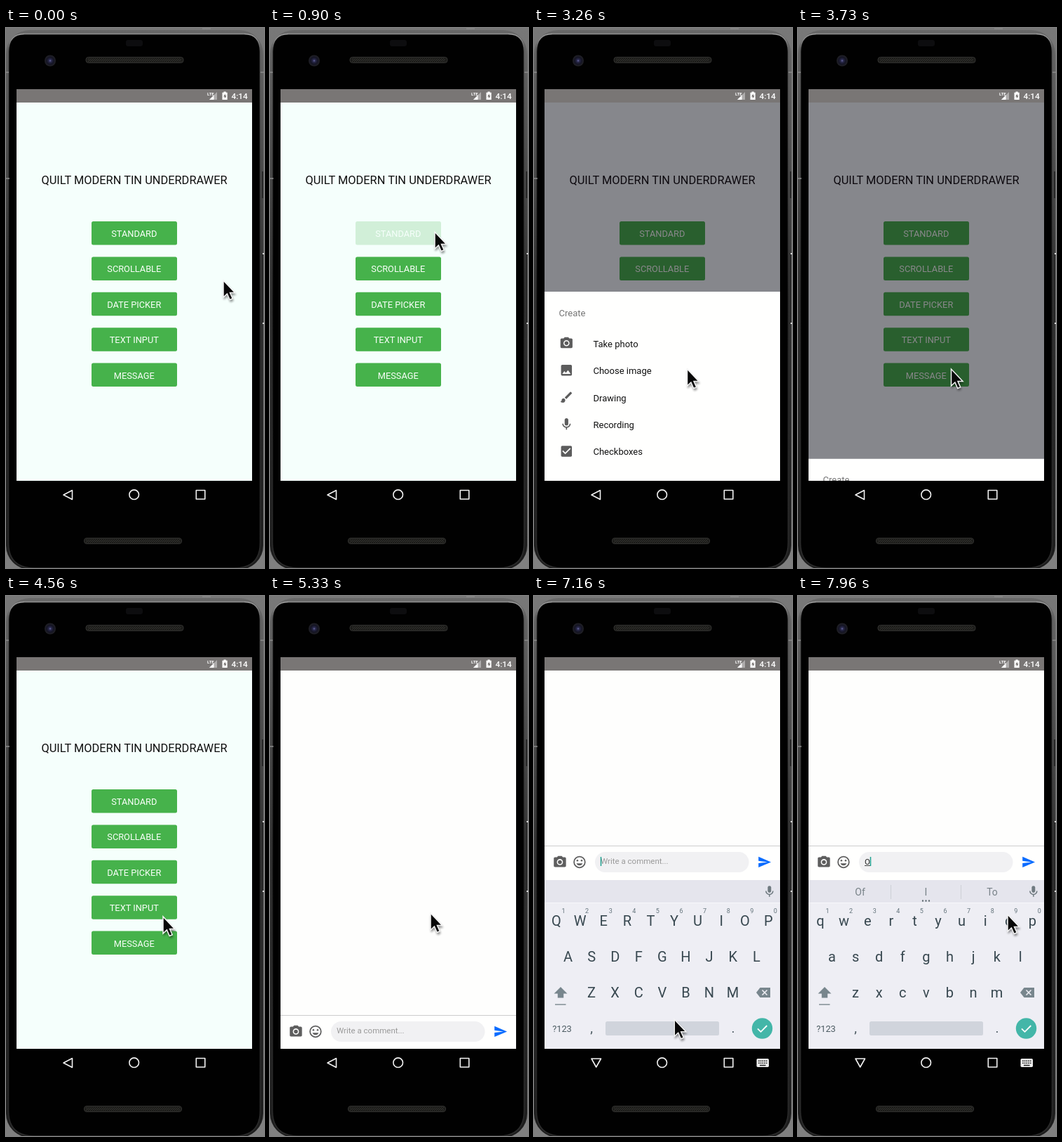
Animation of 368x768 px, one loop 8 s. Source, as an HTML page:

```html
<!DOCTYPE html>
<html lang="en">
<head>
<meta charset="utf-8">
<title>Bottom sheet demo</title>
<style>
  html, body { margin: 0; width: 100%; height: 100%; overflow: hidden; background: #666; }
  svg { display: block; width: 368px; height: 768px; font-family: Roboto, sans-serif; }
  .mid { text-anchor: middle; }
</style>
</head>
<body>
<svg viewBox="0 0 368 768">
  <defs>
    <linearGradient id="rim" x2="0" y2="1">
      <stop offset="0" stop-color="#686868"/><stop offset=".1" stop-color="#5c5c5c"/>
      <stop offset=".45" stop-color="#343434"/><stop offset="1" stop-color="#1c1c1c"/>
    </linearGradient>
    <linearGradient id="edge" x2="0" y2="1">
      <stop offset="0" stop-color="#a0a0a0"/><stop offset=".03" stop-color="#555"/>
      <stop offset=".5" stop-color="#222"/><stop offset="1" stop-color="#2c2c2c"/>
    </linearGradient>
    <linearGradient id="wall" x2="0" y2="1">
      <stop offset="0" stop-color="#787878"/><stop offset=".3" stop-color="#686868"/><stop offset="1" stop-color="#808080"/>
    </linearGradient>
    <radialGradient id="lens">
      <stop offset="0" stop-color="#7070a8"/><stop offset=".22" stop-color="#2c2c50"/>
      <stop offset=".6" stop-color="#141424"/><stop offset="1" stop-color="#222226"/>
    </radialGradient>
    <pattern id="mesh" width="3" height="3" patternUnits="userSpaceOnUse">
      <path d="M0 3L3 0" stroke="#3c3c39" stroke-width=".8"/>
    </pattern>
    <clipPath id="screen"><path d="M15 87h336v557H15z"/></clipPath>
    <filter id="soft" x="-50%" y="-50%" width="200%" height="200%"><feGaussianBlur stdDeviation="1.7"/></filter>

    <g id="camera"><path fill-rule="evenodd" d="M9 2L7.2 4H4c-1.1 0-2 .9-2 2v12c0 1.1.9 2 2 2h16c1.1 0 2-.9 2-2V6c0-1.1-.9-2-2-2h-3.2L15 2zM12 7a5 5 0 0 1 0 10 5 5 0 0 1 0-10z"/><circle cx="12" cy="12" r="3.2"/></g>
    <path id="image" d="M21 19V5c0-1.1-.9-2-2-2H5c-1.1 0-2 .9-2 2v14c0 1.1.9 2 2 2h14c1.1 0 2-.9 2-2zM8.5 13.5l2.5 3 3.5-4.5 4.5 6H5z"/>
    <path id="brush" d="M7 14c-1.7 0-3 1.3-3 3 0 1.3-1.2 2-2 2 .9 1.2 2.5 2 4 2 2.2 0 4-1.8 4-4 0-1.7-1.3-3-3-3zm13.7-9.4l-1.3-1.3c-.4-.4-1-.4-1.4 0l-9 9L11.8 15l8.9-9c.4-.4.4-1 0-1.4z"/>
    <g id="mic"><rect x="9" y="2" width="6" height="12" rx="3"/><path d="M5.9 11a6.1 6 0 0 0 12.2 0M12 17v4" fill="none" stroke="currentColor" stroke-width="1.9"/></g>
    <path id="check" d="M19 3H5c-1.1 0-2 .9-2 2v14c0 1.1.9 2 2 2h14c1.1 0 2-.9 2-2V5c0-1.1-.9-2-2-2zm-9 14l-5-5 1.4-1.4 3.6 3.6 7.6-7.6L19 8z"/>
    <g id="smile"><circle cx="12" cy="12" r="9" fill="none" stroke="currentColor" stroke-width="2"/><circle cx="8.5" cy="9.5" r="1.5"/><circle cx="15.5" cy="9.5" r="1.5"/><path d="M6.9 14h10.2a5.5 5.5 0 0 1-10.2 0z"/></g>
    <path id="send" d="M2 21l21-9L2 3v7l15 2-15 2z"/>
    <path id="arrow" d="M0 0V24L5.4 18.9 9.2 27.5 13.2 25.8 9.5 17.4H16.6Z"/>
  </defs>

  <!-- device -->
  <path d="M0 0h368v768H0z" fill="url(#wall)"/>
  <rect x="0" y="3" width="367" height="767" rx="34" fill="url(#rim)"/>
  <path d="M26 8.500H340Q362.500 8.500 362.500 34V732Q362.500 768 326 768H40Q3.500 768 3.500 732V34Q3.500 8.500 26 8.500Z" fill="#010101" stroke="url(#edge)" stroke-width="1.500"/>
  <path d="M26 8.500H340" stroke="#8c8c8c" stroke-width="1.200"/>
  <path d="M280 1h12M0 63h4M363 63h5M0 214h5" stroke="#8a8a8a" stroke-width="1.500"/>
  <path d="M366 204v38M366 321v99" stroke="#252525" stroke-width="2"/>
  <path d="M366 321h2M366 420h2" stroke="#ddd" stroke-width="2"/>
  <rect x="171" y="17" width="24" height="9" rx="3" fill="#0d0d0f"/>
  <circle cx="63" cy="46.500" r="8" fill="url(#lens)"/>
  <g fill="#1b1b19" stroke="#343432">
    <rect x="114" y="41.500" width="139" height="8" rx="3.500"/>
    <rect x="111.500" y="725.500" width="139" height="8" rx="3.500"/>
  </g>
  <path d="M117 43h133v5H117zM114 727h134v5H114z" fill="url(#mesh)"/>

  <!-- navigation bar -->
  <g fill="none" stroke="#f2f2f2" stroke-width="1.600" stroke-linejoin="round">
    <path id="back" d="M94.500 657.500V670.500L82 664Z"/>
    <path id="down" d="M82 658H95.500L88.700 670Z"/>
    <circle cx="182.700" cy="663.700" r="6.800"/>
    <rect x="271.300" y="657.500" width="12.500" height="12.500"/>
  </g>
  <g id="kbIcon">
    <rect x="317.500" y="658" width="17.500" height="12" rx="1.700" fill="#eee"/>
    <path d="M320 661.300h13M320 664.200h13" stroke="#222" stroke-width="1.600" stroke-dasharray="1.700 1"/>
    <path d="M322 667.500h8.500" stroke="#222" stroke-width="1.500"/>
  </g>

  <g clip-path="url(#screen)">
    <path d="M15 87h336v558H15z" fill="#f5fffc"/>
    <text class="mid" x="183" y="221.500" font-size="16.400" fill="#111">QUILT MODERN TIN UNDERDRAWER</text>
    <g id="buttons" class="mid" font-size="12.800"></g>
    <path id="shade" d="M15 106h336v539H15z" fill="rgba(10,0,14,.47)"/>

    <g id="sheet">
      <path d="M15 375h336v270H15z" fill="#fffffe"/>
      <text x="35.500" y="409.500" font-size="13" fill="#757575">Create</text>
      <g id="rows" font-size="13"></g>
    </g>

    <path id="page" d="M15 106h336v539H15z" fill="#fefefd"/>
    <g id="bar">
      <path d="M15 596h336v49H15z" fill="#fffffe"/>
      <path d="M15 596.500h336" stroke="#cdcdcd"/>
      <g fill="#5e5e5e" color="#5e5e5e">
        <use href="#camera" transform="translate(26.500 609) scale(.87)"/>
        <use href="#smile" transform="translate(54.500 609) scale(.87)"/>
      </g>
      <rect x="87" y="605" width="219.500" height="29" rx="14.500" fill="#f1f1f3"/>
      <text id="hint" x="95" y="622" font-size="11.500" fill="#9a9a9a">Write a comment...</text>
      <g id="typed"><text x="95" y="622.500" font-size="11.500" fill="#222">O</text><path d="M95 624.500h8" stroke="#444"/></g>
      <path id="caret" d="M0 612v13" stroke="#1fa08f" stroke-width="1.500"/>
      <use href="#send" fill="#0a6cff" transform="translate(318.500 609.200) scale(.85)"/>
    </g>

    <g id="keyboard">
      <path d="M15 404h336v241H15z" fill="#eeeef4"/>
      <path d="M15 404h336v32H15z" fill="#e5e5ed"/>
      <path d="M15 436.500h336" stroke="#f8f8fb"/>
      <g id="words">
        <g class="mid" font-size="14" fill="#788288">
          <text x="88.500" y="426">Of</text><text x="182.500" y="426">I</text><text x="277" y="426">To</text>
        </g>
        <path d="M132.500 411v20M232.500 411v20" stroke="#cdd0d6"/>
        <path d="M178 433.500h9.200" stroke="#5f6b70" stroke-width="2.400" stroke-linecap="round" stroke-dasharray="0 4.500"/>
      </g>
      <use href="#mic" fill="#6f7a80" color="#6f7a80" transform="translate(326 410.500) scale(.82)"/>
      <g id="digits" class="mid" font-size="9" fill="#62727a"></g>
      <g id="upper" class="mid" font-size="20" fill="#37474f"></g>
      <g id="lower" class="mid" font-size="20" fill="#37474f"></g>
      <path d="M38 556l9.500 9.500h-5.300v6h-8.400v-6h-5.300z" fill="#78868d"/>
      <path d="M30 581h15.500" stroke="#78868d" stroke-width="1.400"/>
      <path d="M317 564l5.500-7H337v14h-14.500z" fill="#78868d"/>
      <path d="M325.500 560.500l7 7m0-7l-7 7" stroke="#eeeef4" stroke-width="1.600"/>
      <g class="mid" fill="#4a5960">
        <text x="40" y="619.500" font-size="12.800">?123</text>
        <text x="82" y="621" font-size="19">,</text><text x="284" y="621" font-size="19">.</text>
      </g>
      <rect x="102" y="605" width="162" height="20" rx="2.500" fill="#d0d4dc"/>
      <circle cx="325.500" cy="615" r="14.700" fill="#43b6a8"/>
      <path d="M319 615.300l4.500 4.500 8.800-8.800" fill="none" stroke="#fff" stroke-width="1.800"/>
      <g id="popup">
        <rect x="283.500" y="387" width="35" height="48" rx="3" fill="#fff"/>
        <text class="mid" x="301" y="418" font-size="22" fill="#37474f">O</text>
      </g>
    </g>

    <path d="M15 87h336v19H15z" fill="#797675"/>
    <g fill="#fff">
      <text x="287" y="95.500" font-size="6" font-weight="700">LTE</text>
      <path d="M301 91v11h-11z" opacity=".4"/><path d="M296.500 95.500V102H290z"/>
      <path d="M310.500 90.500h3.200v1.300h2V102h-7.200V91.800h2z"/>
      <path d="M312.800 93.500l-2.600 4h1.700v3l2.500-4.200h-1.600z" fill="#6c6866"/>
      <text x="321.500" y="101" font-size="11.800" font-weight="500">4:14</text>
    </g>
  </g>

  <g id="cursor">
    <use href="#arrow" x="1" y="3" fill="#000" stroke="#000" opacity=".42" filter="url(#soft)"/>
    <use href="#arrow" fill="#080808" stroke="#f4f4f4" stroke-width="1.500"/>
  </g>
</svg>

<script>
const LOOP = 8000, LIFT = 241;
const el = {};
document.querySelectorAll('g[id], path[id], text[id]').forEach(n => el[n.id] = n);

const fill = (id, items, make) => { el[id].innerHTML = items.map(make).join(''); };

fill('buttons', ['STANDARD', 'SCROLLABLE', 'DATE PICKER', 'TEXT INPUT', 'MESSAGE'], (s, i) =>
  `<g transform="translate(0 ${i * 50.4})"><rect x="122" y="275" width="122" height="33.5" rx="2.5" fill="#46b24b"/>
   <text x="182.800" y="297" fill="#fafffa">${s}</text></g>`);

fill('rows', [['camera', 'Take photo'], ['image', 'Choose image'], ['brush', 'Drawing'],
  ['mic', 'Recording'], ['check', 'Checkboxes']], ([icon, label], i) =>
  `<g transform="translate(0 ${i * 38.4})" color="#5c5c5c"><use href="#${icon}" fill="#5c5c5c" transform="translate(36 438) scale(.86)"/>
   <text x="84.500" y="453.800" fill="#111">${label}</text></g>`);

const keyRows = [['qwertyuiop', 32, 469], ['asdfghjkl', 48.5, 519.5], ['zxcvbnm', 82, 571]];
const keys = up => ([row, x, y]) => [...row].map((c, i) =>
  `<text x="${x + i * 33.6}" y="${y}">${up ? c.toUpperCase() : c}</text>`).join('');
fill('upper', keyRows, keys(true));
fill('lower', keyRows, keys(false));
fill('digits', [...'1234567890'], (d, i) => `<text x="${42 + i * 33.6}" y="450.5">${d}</text>`);

// time, x, y, eased arrival
const path = [
  [0, 310, 359], [760, 235, 290, 1], [1830, 235, 290], [1860, 235, 300], [2660, 235, 400],
  [3260, 218.5, 485, 1], [4270, 218.5, 485], [4560, 224, 456], [4930, 229, 451],
  [5670, 229, 451], [6270, 196.5, 608, 1], [7070, 196.5, 608], [7860, 299, 453, 1], [LOOP, 299, 453]
];

const prog = (t, a, b) => Math.min(1, Math.max(0, (t - a) / (b - a)));
const smooth = p => p * p * (3 - 2 * p);
const ramp = (t, a, b) => smooth(prog(t, a, b));
const within = (t, a, b) => t >= a && t < b;
const show = (n, on) => { n.style.display = on ? '' : 'none'; };
const move = (n, x, y) => n.setAttribute('transform', `translate(${x.toFixed(2)} ${y.toFixed(2)})`);
const press = (t, down, up) => t < down ? 1 : t < up ? .2 : .2 + .8 * prog(t, up, up + 150);

function cursorAt(t) {
  const i = Math.max(1, path.findIndex(p => p[0] > t));
  const [t0, x0, y0] = path[i - 1], [t1, x1, y1, eased] = path[i];
  let p = prog(t, t0, t1);
  if (eased) p = smooth(p);
  return [x0 + (x1 - x0) * p, y0 + (y1 - y0) * p];
}

function render(t) {
  move(el.cursor, ...cursorAt(t));

  el.buttons.children[0].style.opacity = press(t, 880, 1100);
  el.buttons.children[3].style.opacity = press(t, 4950, 5200);
  el.rows.children[1].style.opacity = press(t, 3320, 3500);

  show(el.shade, within(t, 1100, 3800));
  show(el.sheet, within(t, 1100, 3800));
  move(el.sheet, 0, 270 * (1 - ramp(t, 1080, 1300) + ramp(t, 3480, 3800)));

  const lift = ramp(t, 6540, 6730), typed = t >= 7890;
  show(el.page, t >= 5200);
  show(el.bar, t >= 5200);
  move(el.bar, 0, 49 * (1 - ramp(t, 5170, 5330)) - LIFT * lift);
  show(el.caret, t >= 6290);
  move(el.caret, typed ? 103.5 : 95.5, 0);
  show(el.hint, !typed);
  show(el.typed, typed);

  show(el.keyboard, lift > 0);
  move(el.keyboard, 0, LIFT * (1 - lift));
  show(el.upper, !typed);
  show(el.lower, typed);
  show(el.words, t >= 7930);
  show(el.popup, within(t, 7870, 7945));

  const open = t >= 6460;
  show(el.back, !open);
  show(el.down, open);
  show(el.kbIcon, open);
}

(function tick() {
  render(performance.now() % LOOP);
  requestAnimationFrame(tick);
})();
</script>
</body>
</html>
```
